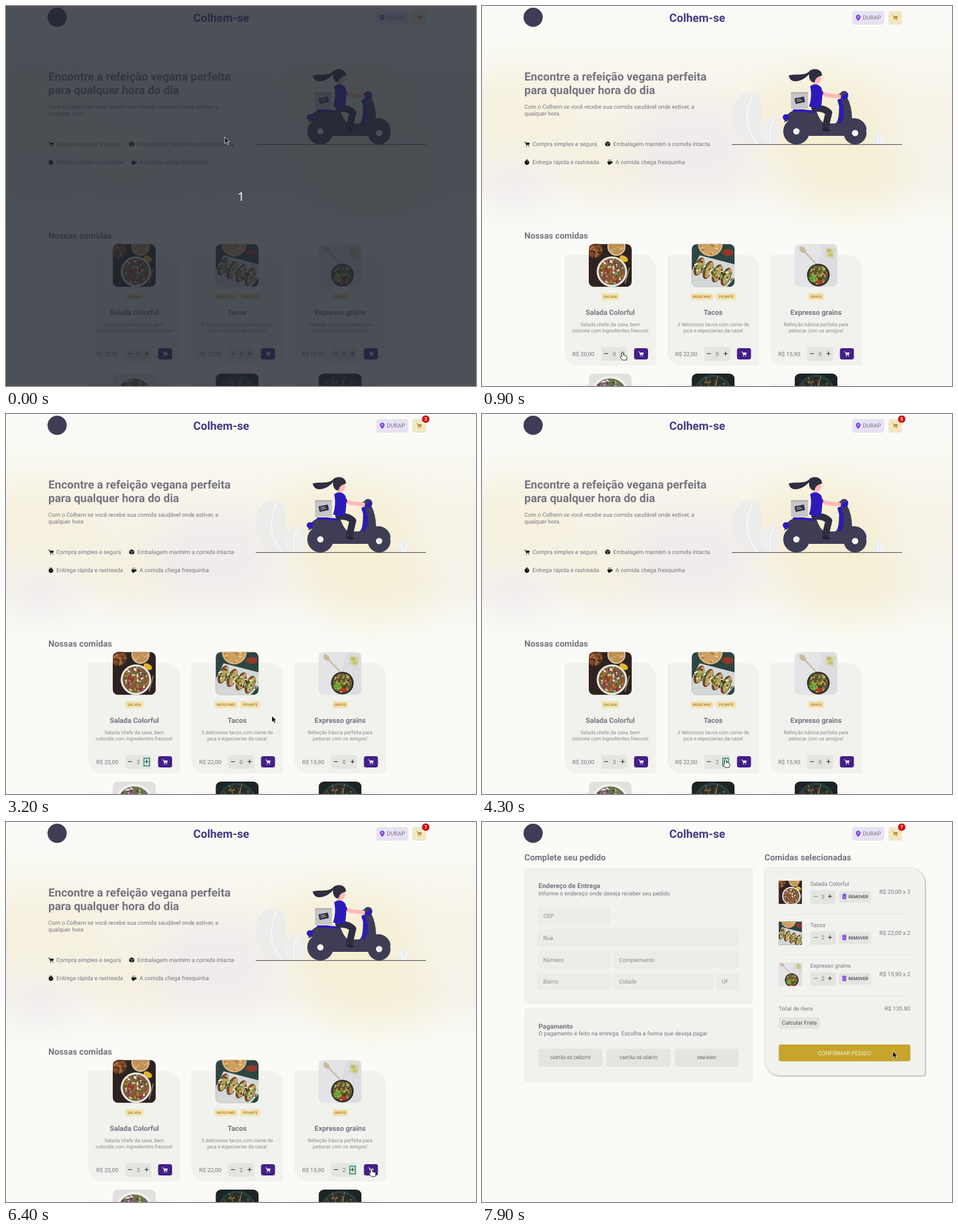
Write an HTML page that moves like this. It is 832x673 px and loops after 8000 ms.

```html
<!DOCTYPE html>
<html lang="pt-BR">
<head>
<meta charset="utf-8">
<title>Comidas</title>
<style>
  html, body { margin: 0; width: 100%; height: 100%; overflow: hidden; background: #fafbf6; }
  svg { display: block; }
  #stage { width: 832px; height: 673px; }
  text { font-family: Roboto, sans-serif; text-rendering: geometricPrecision; }
</style>
</head>
<body>
<svg id="stage" viewBox="0 0 832 673"></svg>
<script>
const ZOOM = 0.632; // the page is shown at this browser zoom
const INK = '#777480', PURPLE = '#441f8a', VIOLET = '#7a3fe4', BG = '#fafbf6', CARD = '#f1f2ed', GREY = '#e4e5e1';
const NAVY = '#3f3d56', HAIR = '#2f2e41', BLUE = '#2d1abb', SKIN = '#ffb8b8', GOLD = '#c0831c';

// ---- helpers
const text = (x, y, s, { size = 16, fill = INK, b, w = b ? 700 : 400, mid, end, id } = {}) =>
  `<text x="${x}" y="${y}" ${id ? `id="${id}"` : ''} font-size="${size * ZOOM}" fill="${fill}" font-weight="${w}"
    text-anchor="${mid ? 'middle' : end ? 'end' : 'start'}">${s}</text>`;
const rect = (x, y, w, h, fill, r = 0, extra = '') =>
  `<rect x="${x}" y="${y}" width="${w}" height="${h}" rx="${r}" fill="${fill}" ${extra}/>`;
const circle = (x, y, r, fill) => `<circle cx="${x}" cy="${y}" r="${r}" fill="${fill}"/>`;
const oval = (x, y, rx, ry, fill, turn = 0, extra = '') =>
  `<ellipse cx="${x}" cy="${y}" rx="${rx}" ry="${ry}" fill="${fill}" transform="rotate(${turn} ${x} ${y})" ${extra}/>`;
const path = (d, fill, extra = '') => `<path d="${d}" fill="${fill}" ${extra}/>`;
const line = (d, color, w = 1) =>
  `<path d="${d}" fill="none" stroke="${color}" stroke-width="${w}" stroke-linejoin="round"/>`;
const limb = (d, color, w) => line(d, color, w).replace('/>', ' stroke-linecap="round"/>');
const at = (x, y, body, scale = 1) => `<g transform="translate(${x} ${y}) scale(${scale})">${body}</g>`;
const each = (list, fn) => list.map(fn).join('');

// Panel with two small and two large corners
const leafBox = (x, y, w, h, s, l, extra = '') => path(
  `M${x + s} ${y}H${x + w - l}a${l} ${l} 0 0 1 ${l} ${l}V${y + h - s}a${s} ${s} 0 0 1 ${-s} ${s}` +
  `H${x + l}a${l} ${l} 0 0 1 ${-l} ${-l}V${y + s}a${s} ${s} 0 0 1 ${s} ${-s}z`, CARD, extra);

const cart = (x, y, color) => at(x, y,
  path('M0 .6H2L2.5 2.4H10L8.7 6.6H3.3L1.5 1.6H0z', color) + circle(4, 8.4, 1, color) + circle(8, 8.4, 1, color), .95);

const minus = (x, y, c = '#222') => line(`M${x - 3.5} ${y}h7`, c, 1.1);
const plus = (x, y) => minus(x, y) + line(`M${x} ${y - 3.5}v7`, '#222', 1.1);

// Scatter of small food pieces in a disc
function bits(cx, cy, r, n, colors) {
  let seed = cx * 97 + cy * 31 + n, out = '';
  const rnd = () => (seed = (seed * 16807) % 2147483647) / 2147483647;
  for (let i = 0; i < n; i++) {
    const a = rnd() * 2 * Math.PI, d = r * Math.sqrt(rnd());
    out += oval((cx + d * Math.cos(a)).toFixed(1), (cy + d * Math.sin(a)).toFixed(1),
      (1 + rnd() * 2.6).toFixed(1), 1.5, colors[i % colors.length], Math.round(rnd() * 180));
  }
  return out;
}
const bowl = (x, y, r, rim, base, n, colors) =>
  circle(x, y, r, rim) + circle(x, y, r * .87, base) + bits(x, y, r * .8, n, colors);

// ---- dish pictures, each on a 76 x 76 tile
const GREENS = ['#5c8238', '#a3b052'], CREAM = '#efe7d8';
const dishes = {
  salad: ['#2f2321',
    bowl(10, 10, 15, '#5a3523', '#7c4a2b', 20, ['#a9703f', '#4a2a1c']) +
    bowl(49, 5, 16, '#d9c7a8', '#c08f54', 8, ['#d9ae74']) + oval(62, 26, 8, 5, '#e3b52e', 30) +
    bowl(41, 49, 27, '#ebe5dc', '#7d5a3e', 95, [...GREENS, CREAM, '#6b2f58', '#c9702f', '#a03328']) +
    line('M64 70L72 42', '#a08f80', 1.5)],
  tacos: ['#2d4543',
    bowl(33, 0, 22, '#d9b27b', '#cfa062', 18, ['#ecd09a', '#a9703a']) + oval(64, 15, 10, 6, '#93382a') +
    path('M0 48L14 20 76 36V60L62 76H0z', '#d3d7d6') +
    each([0, 1, 2, 3], i => {
      const x = 13 + 16 * i, y = 40 + 6 * i;
      return oval(x, y, 8, 17, '#6b472c', 22) + oval(x + 2, y, 5, 15, '#c79d62', 22) +
        bits(x + 1, y, 10, 26, [...GREENS, CREAM, '#4a3022']);
    })],
  grains: ['#dcdde0',
    path('M0 0H50L30 76H0z', '#e4e4e7') + limb('M17 13L43 40', '#c4b29a', 2.2) + oval(14, 10, 4.5, 7, '#cbb9a0', -40) +
    path('M56 6l16 3-3 17-15-4z', '#cfd3b4') + oval(61, 12, 4, 3, '#b8bd4b') + oval(64, 19, 4, 3, '#c9c75c') +
    bowl(42, 55, 20, '#2c2a2b', '#5f5030', 60, ['#c9a740', '#8a6a3c', '#3f3023', ...GREENS]) +
    bits(32, 61, 6, 22, ['#7ab33f', '#5f9a30']) + circle(44, 67, 4, '#c42d2d')],
  bowl: ['#e2e1e0',
    bowl(38, 38, 34, '#f2f0ee', '#6f6f55', 150, [...GREENS, CREAM, '#6d3f77', '#3c3a38', '#9a5a8d'])],
  dark: ['#1d2423',
    bowl(38, 36, 34, '#28403d', '#232d29', 80, ['#4e5c38', '#8a6a42', '#26362f', '#6b3328']) +
    line('M24 6L34 30M46 4L42 28', '#a8895a', 1)]
};
const dish = (name, x, y, size = 76) => at(x, y,
  `<g clip-path="url(#tile)">${rect(0, 0, 76, 76, dishes[name][0])}${dishes[name][1]}</g>`, size / 76);

// ---- shared header
const header =
  circle(90.5, 20, 17, NAVY) +
  text(381, 28, 'Colhem-se', { b: 1, size: 32, mid: 1, fill: '#453a86' }) +
  rect(655.5, 9, 56.5, 24, '#e8e2f4', 4) +
  path('M666 26.5Q661.8 22 661.8 19.6a4.2 4.2 0 0 1 8.4 0Q670.2 22 666 26.5z', VIOLET) + circle(666, 19.8, 1.4, '#e8e2f4') +
  text(674, 24.4, 'DURAP') +
  rect(719.5, 9, 24, 24, '#f0e7c4', 4) + cart(726.5, 16, GOLD) +
  `<g id="badge">${circle(743, 9, 6.6, '#d50b0b')}${text(743, 12.1, '', { id: 'total', b: 1, size: 13.6, mid: 1, fill: '#fff' })}</g>`;

// ---- hero
const glow = (x, y, r, color) => oval(x, y, r * 1.4, r, color, 0, 'opacity=".6" filter="url(#soft)"');
const hero = rect(0, 40, 832, 360, 'url(#haze)') +
  glow(60, 200, 75, '#f5f0d8') + glow(230, 270, 60, '#f4efda') + glow(600, 200, 85, '#f4edca') + glow(650, 295, 75, '#f4eecd') +
  glow(370, 250, 75, '#ece6f0') + glow(60, 320, 35, '#ebe6f3');

const wheel = (x, y, r) => circle(x, y, r, NAVY) + circle(x, y, 5.6, '#f6f5ee');
const scooter =
  path('M482 245C430 238 432 153 474 153 505 156 493 185 496 205 500 225 510 236 522 245z', '#ececea') +
  path('M500 245C485 215 500 195 514 197 532 200 536 230 520 245z', '#eeeeec') +
  path('M693 245Q687 232 696 234 699 216 707 228 717 222 711 245z', '#eeeeec') +
  line('M480 156Q456 205 489 245M517 203Q505 220 511 245M701 226v19M710 231l-4 14', '#fff', 1.2) +
  line('M442 245.3H743.5', '#33313f') +
  // frame, seat and front shield
  path('M535 206C538 188 552 182 568 183L592 186Q598 204 606 208H624C634 206 630 185 634 164L646 161Q655 178 655 199C668 197 680 206 681 219L640 230H574L566 210Q550 198 535 206z', NAVY) +
  limb('M552 185L588 187', BLUE, 4) + limb('M633 168Q641 190 633 204', BLUE, 7) +
  circle(538, 197, 5.6, BLUE) + circle(641, 158, 7.5, BLUE) + limb('M630 160L642 154', NAVY, 6) +
  wheel(556.5, 222, 23.2) + wheel(660.5, 225, 20.2) +
  // delivery box
  rect(547, 152.5, 30, 29.5, '#c6c5c8') + rect(547, 152.5, 30, 3, '#b4b3b7') +
  `<g transform="rotate(-12 562 167)">${rect(554, 162, 17, 10, HAIR, 1)}${line('M557 165h8M557 168h10', '#dddde0')}</g>` +
  // rider
  limb('M589 181Q606 180 614 189L608 214', HAIR, 12) + limb('M605 219L613 220', '#252434', 5) +
  limb('M591 130V140', SKIN, 7) + oval(594, 129, 6.5, 8, SKIN) +
  limb('M599 154L612 158 632 160', SKIN, 7) +
  path('M581 142Q592 134 601 145 604 160 600 180 590 182 579 178 585 160 581 142z', BLUE) + limb('M593 146L599 154', BLUE, 10) +
  path('M602 123C601 109 583 110 579 116 570 125 554 119 543 123 545 138 565 136 579 121 578 130 584 137 589 135 590 129 592 126 602 123z', HAIR);

const feature = (x, y, icon, label, gap) => at(x, y - 8.2, icon) + text(x + gap, y, label);
const intro =
  text(75, 132, 'Encontre a refeição vegana perfeita', { b: 1, size: 32 }) +
  text(75, 156, 'para qualquer hora do dia', { b: 1, size: 32 }) +
  text(75, 181.6, 'Com o Colhem-se você recebe sua comida saudável onde estiver, a') +
  text(75, 193.8, 'qualquer hora') +
  feature(75, 248, cart(0, 0, '#111'), 'Compra simples e segura', 14.2) +
  feature(218, 248, path('M4.5 0L9 2.2V7L4.5 9.3 0 7V2.2z', '#111') + line('M.4 2.4L4.5 4.6 8.6 2.4M4.5 4.6V9', BG, .7), 'Embalagem mantém a comida intacta', 14.5) +
  feature(75, 280.4, circle(4.5, 5, 4, '#111') + rect(3, -.4, 3, 1, '#111') + line('M4.5 5l1.8-1.8', BG, .8), 'Entrega rápida e rastreada', 14.2) +
  feature(222, 280.4, path('M0 3H9V6.4H7Q6 8.8 3.7 8.8 0 8.8 0 3z', '#111') + line('M2 0v2M4 0v2M6 0v2', '#111', .9), 'A comida chega fresquinha', 14.2) +
  text(75, 411.8, 'Nossas comidas', { b: 1, size: 24 });

// ---- product cards
const foods = [
  { dish: 'salad', name: 'Salada Colorful', tags: [['SALADA', 0]], price: '20,00', qty: 3, lines: ['Salada chefe da casa, bem', 'colorida com ingredientes frescos!'] },
  { dish: 'tacos', name: 'Tacos', tags: [['MEXICANO', -20], ['PICANTE', 23]], price: '22,00', qty: 2, lines: ['3 deliciosos tacos com carne de', 'jaca e especiarias da casa!'] },
  { dish: 'grains', name: 'Expresso grains', tags: [['GRÃOS', 0]], price: '15,90', qty: 2, lines: ['Refeição básica perfeita para', 'petiscar com os amigos!'] }
];
const cardX = i => 146 + 182.2 * i;

const tag = ([s, dx]) => {
  const w = 8 + 4 * s.length;
  return rect(81 + dx - w / 2, 508.5, w, 12.5, '#f0e4b8', 1.5) + text(81 + dx, 517.1, s, { mid: 1, b: 1, size: 10, fill: GOLD });
};
const card = (f, i) => at(cardX(i), 0,
  leafBox(0, 441, 162, 195.5, 4, 23) + dish(f.dish, 43, 421.5) + each(f.tags, tag) +
  text(81, 546.5, f.name, { mid: 1, b: 1, size: 20 }) +
  each(f.lines, (s, k) => text(81, 566.8 + 10.8 * k, s, { mid: 1, size: 14, fill: '#8a8791' })) +
  text(13.8, 619.6, 'R$ ' + f.price) +
  rect(65.3, 604, 45.6, 24, GREY, 4) + minus(73.6, 615.6) + plus(103, 615.6) +
  text(88.2, 619.6, '0', { mid: 1, id: 'qty' + i }) +
  rect(123.2, 606, 24.8, 20, PURPLE, 4) + cart(130.8, 611.5, '#fff'));

const nextRow = each(['bowl', 'dark', 'dark'], (d, i) =>
  at(cardX(i), 0, leafBox(0, 670.5, 162, 195, 4, 23) + dish(d, 43, 651)));

const home = hero + scooter + intro + each(foods, card) + nextRow +
  '<rect id="ring" fill="none" stroke="#1a9468" stroke-width="1.7"/>';

// ---- checkout
const form = [[['CEP', 127]], [['Rua', 354.5]], [['Número', 127], ['Complemento', 220.5]], [['Bairro', 127], ['Cidade', 175], ['UF', 38.5]]];
const fields = each(form, (row, k) => {
  let x = 99.8;
  return each(row, ([s, w]) => {
    const y = 152 + 38.7 * k;
    const box = rect(x, y, w, 29, '#ecede8', 3, 'stroke="#e5e6e1" stroke-width=".7"') + text(x + 8.6, y + 18.2, s, { fill: '#8b8890' });
    x += w + 7;
    return box;
  });
});
const payments = each(['CARTÃO DE CRÉDITO', 'CARTÃO DE DÉBITO', 'DINHEIRO'], (s, i) => {
  const x = 100 + 120.6 * i;
  return rect(x, 401.5, 113, 32, GREY, 4) + text(x + 56.5, 419.8, s, { mid: 1, size: 12, fill: '#5c5763' });
});

const selected = (f, i) => at(0, 72.6 * i,
  `<svg x="525.3" y="104" width="41" height="41" viewBox="4 4 68 68">${dish(f.dish, 0, 0)}</svg>` + text(581, 113.2, f.name) +
  rect(581, 121, 45.6, 24, GREY, 4) + minus(591, 131.7, '#77717f') + plus(616, 131.7) + text(603.7, 135.8, f.qty, { mid: 1 }) +
  rect(631.7, 122.3, 57, 20.5, GREY, 4) + rect(638.2, 129, 6.4, 7.6, VIOLET, 1) + line('M637.2 128.4h8.4M640 127h3', VIOLET) +
  line('M640.4 131v3.8M642.4 131v3.8', GREY, .7) +
  text(648.8, 135.2, 'REMOVER', { size: 12, w: 500, fill: '#45404b' }) +
  text(758.3, 127.4, `R$ ${f.price} x ${f.qty}`, { end: 1 }) + line('M525.3 162.7H758.3', '#e4e5e0'));

const checkout =
  text(75, 68, 'Complete seu pedido', { b: 1, size: 24 }) + text(500, 68, 'Comidas selecionadas', { b: 1, size: 24 }) +
  rect(75, 81, 405, 241, CARD, 4) + rect(75, 330, 405, 131, CARD, 4) +
  text(100, 117.3, 'Endereço de Entrega', { b: 1, size: 18.7 }) + text(100, 129.5, 'Informe o endereço onde deseja receber seu pedido') +
  fields +
  text(100, 366.2, 'Pagamento', { b: 1, size: 18.7 }) + text(100, 378.2, 'O pagamento é feito na entrega. Escolha a forma que deseja pagar') +
  payments +
  leafBox(500, 81, 284, 368, 4, 28, 'style="filter:drop-shadow(1px 1.5px 1.5px rgba(0,0,0,.4))"') +
  each(foods, selected) +
  text(525.3, 333.8, 'Total de itens') + text(758.3, 333.8, 'R$ 135.80', { end: 1 }) +
  rect(525.3, 346, 72.6, 20, GREY, 4) + text(530.8, 359.4, 'Calcular Frete', { fill: '#55505c' }) +
  rect(525.3, 394, 233, 29.7, '', 4, 'id="confirm"') + text(641.8, 412.6, 'CONFIRMAR PEDIDO', { mid: 1, fill: '#f6f0dc' });

const stage = document.getElementById('stage');
stage.innerHTML = `<defs>
  <clipPath id="tile"><rect width="76" height="76" rx="9.5"/></clipPath>
  <filter id="soft" x="-60%" y="-90%" width="220%" height="280%"><feGaussianBlur stdDeviation="30"/></filter>
  <linearGradient id="haze" x2="0" y2="1">
    <stop stop-color="#f6f3e8" stop-opacity="0"/><stop offset=".35" stop-color="#f7f3e8"/>
    <stop offset=".75" stop-color="#f5f2ea"/><stop offset="1" stop-color="#f6f4ee" stop-opacity="0"/>
  </linearGradient></defs>
  ${rect(0, 0, 832, 673, BG)}
  <g id="home">${home}</g><g id="checkout">${checkout}</g>${header}
  <g id="count">${rect(0, 0, 832, 673, '#212630', 0, 'opacity=".8"')}
    <text x="416" y="344.5" text-anchor="middle" style="font:21px 'Noto Sans',sans-serif" fill="#fff">1</text></g>
  <g id="pointer">
    ${path('M0 0V11.6L2.7 9.1 4.6 13.4 6.8 12.4 4.9 8.3H8.6z', '#111', 'id="arrow" stroke="#fff" stroke-width=".8"')}
    ${path('M-1.5 1Q0-1 1.5 1V5.5L5.5 6.3Q8 7 7.6 9.5L6.6 14H-.4L-4.4 8.6Q-4.5 6.4-2.6 7.3L-1.5 8.3z', '#fff', 'id="hand" stroke="#222"')}
  </g>`;

const el = {};
stage.querySelectorAll('[id]').forEach(n => el[n.id] = n);
const show = (n, on) => n.setAttribute('display', on ? 'inline' : 'none');

// ---- timeline
const moves = [ // start, end, x, y: quick flicks that slow down at the goal
  [0, 100, 404, 319], [100, 400, 256, 658], [500, 900, 249, 613], [2000, 2500, 762, 22], [2600, 2900, 731, 24],
  [2900, 3800, 431, 612], [4700, 5300, 616, 612], [6100, 6700, 648, 614], [6900, 7400, 664, 615], [7790, 7900, 727, 406]
];
const clicks = [[1100, 0], [1600, 0], [2000, 0], [4000, 1], [4300, 1], [5500, 2], [5800, 2]]; // time, card
const CART_CLICK = 6800, PAGE_CHANGE = 7500, HOVER = 7900;

function pointerAt(t) {
  let x = 387, y = 232;
  for (const [start, end, toX, toY] of moves) {
    const f = Math.min(1, Math.max(0, (t - start) / (end - start))), e = 1 - (1 - f) ** 5;
    x += (toX - x) * e;
    y += (toY - y) * e;
  }
  return [x, y];
}

const inside = (x, y, l, t, w, h) => x > l && x < l + w && y > t && y < t + h;
const onButton = (x, y) => inside(x, y, 719, 9, 25, 24) || foods.some((_, i) =>
  inside(x - cardX(i), y, 97, 608, 12, 16) || inside(x - cardX(i), y, 123, 606, 25, 20));

function placeRing(x, y, width, height, rx) {
  Object.entries({ x, y, width, height, rx }).forEach(([k, v]) => el.ring.setAttribute(k, v));
}

function draw(t) {
  const ordered = t >= PAGE_CHANGE, done = clicks.filter(c => c[0] <= t), [x, y] = pointerAt(t);
  show(el.count, t < 100);
  show(el.home, !ordered);
  show(el.checkout, ordered);
  show(el.badge, done.length);
  show(el.ring, done.length);
  el.total.textContent = done.length;
  foods.forEach((_, i) => el['qty' + i].textContent = done.filter(c => c[1] === i).length);

  if (t >= CART_CLICK) placeRing(cardX(2) + 123, 605.5, 26, 21, 4);
  else if (done.length) placeRing(cardX(done.at(-1)[1]) + 98.2, 609.6, 9.8, 13.6, 0);

  el.confirm.setAttribute('fill', t >= HOVER ? '#c7a52c' : '#dbac2c');
  const hand = !ordered && t >= 100 && onButton(x, y);
  show(el.hand, hand);
  show(el.arrow, !hand);
  el.pointer.setAttribute('transform', `translate(${x.toFixed(1)} ${y.toFixed(1)})`);
}

function tick() {
  draw(Math.floor(performance.now() % 8000 / 100) * 100);
  requestAnimationFrame(tick);
}
tick();
</script>
</body>
</html>
```
